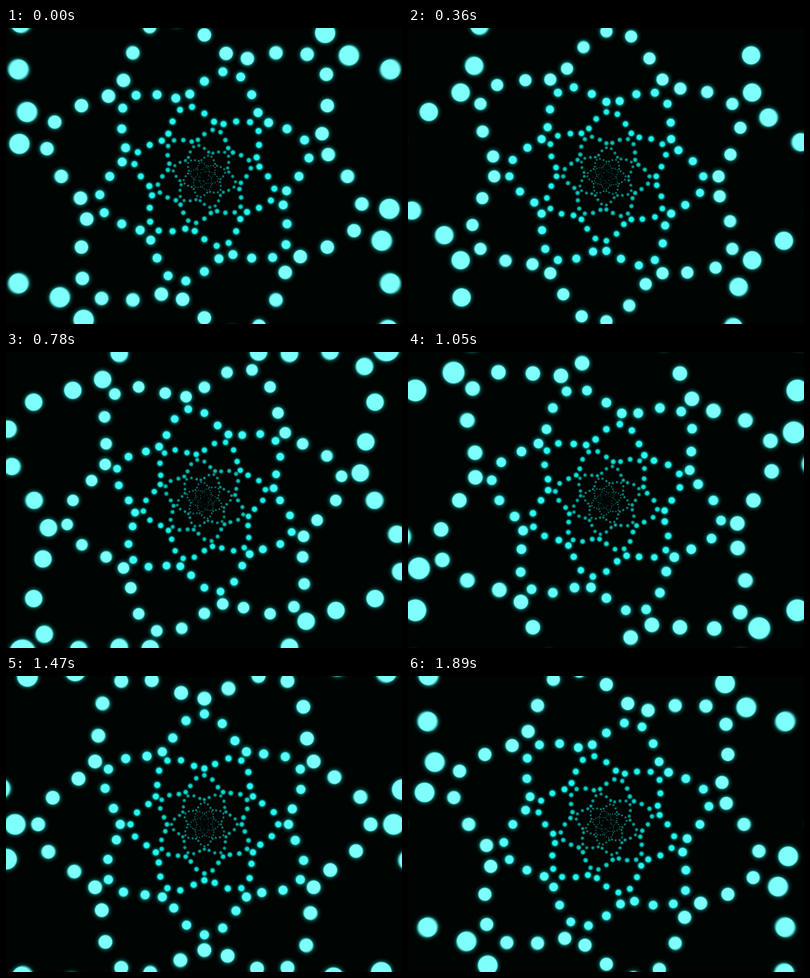
These frames come from a looping animation (512x384 px, 1.92 s). An HTML page with a canvas:

```html
<!DOCTYPE html>
<html lang="en">
<head>
<meta charset="utf-8">
<title>Dot star tunnel</title>
<style>
  html, body { margin: 0; width: 100%; height: 100%; overflow: hidden; background: #000403; }
  canvas { display: block; }
</style>
</head>
<body>
<canvas id="stage" width="512" height="384"></canvas>
<script>
  const ctx = document.getElementById('stage').getContext('2d');
  const TAU = Math.PI * 2;
  const STEP = 30, STEPS = 64;
  const CX = 256.5, CY = 192.5;
  const DOTS = 36, RATIO = 1.5, BASE = 182.9;
  const WAVE = 0.138, DOT_SIZE = 0.0475, MAX_HALO = 6;
  const MID = 0.3, SHUTTER = 0.4, SAMPLES = 5;

  const clamp = x => Math.max(0, Math.min(1, x));
  const mix = (a, b, w) => Math.round(a + (b - a) * w);

  // Solid core with a crisp rim and a faint halo; larger rings are whiter.
  function shade(radius, core, outer) {
    const white = clamp((radius - 60) / 100), light = clamp(radius / 100);
    const rgb = [mix(10, 126, white), mix(200, 255, light), mix(190, 249, light)];
    const edge = Math.min(0.7, core * 0.3);
    const g = ctx.createRadialGradient(0, 0, 0, 0, 0, outer);
    const stop = (r, color) => g.addColorStop(clamp(r / outer), `rgba(${color})`);
    stop(0, [...rgb, 1]);
    stop(core - edge, [...rgb, 1]);
    stop(core + edge, [0, 190, 178, 0.42]);
    stop(core + (outer - core) * 0.4, [0, 165, 155, 0.17]);
    stop(outer, [0, 140, 130, 0]);
    return g;
  }

  function drawRing(k, u) {
    const radius = BASE * RATIO ** (k + 4 * u);
    if (radius < 2 || radius > 420) return;
    const side = k % 2 ? 1 : -1;
    const core = radius * DOT_SIZE;
    const outer = core + Math.min(MAX_HALO, core);
    ctx.fillStyle = shade(radius, core, outer);
    ctx.globalAlpha = Math.min(1, 0.3 + radius / 90) / SAMPLES;
    for (let i = 0; i < DOTS; i++) {
      const a = i * TAU / DOTS;
      const r = radius * (1 + side * WAVE * Math.sin(6 * a - TAU * u));
      ctx.setTransform(1, 0, 0, 1, CX + r * Math.cos(a), CY - r * Math.sin(a));
      ctx.beginPath();
      ctx.arc(0, 0, outer, 0, TAU);
      ctx.fill();
    }
  }

  function draw(step) {
    ctx.setTransform(1, 0, 0, 1, 0, 0);
    ctx.globalCompositeOperation = 'source-over';
    ctx.globalAlpha = 1;
    ctx.fillStyle = '#000403';
    ctx.fillRect(0, 0, 512, 384);
    ctx.globalCompositeOperation = 'lighter';
    // Several moments within one step give the motion blur.
    for (let s = 0; s < SAMPLES; s++) {
      const u = (step + MID + SHUTTER * ((s + 0.5) / SAMPLES - 0.5)) / STEPS;
      for (let k = -16; k <= 2; k++) drawRing(k, u);
    }
  }

  const start = performance.now();
  let shown = -1;
  function tick(now) {
    const step = Math.floor(Math.max(0, now - start) / STEP) % STEPS;
    if (step !== shown) draw(shown = step);
    requestAnimationFrame(tick);
  }
  tick(start);
</script>
</body>
</html>
```
